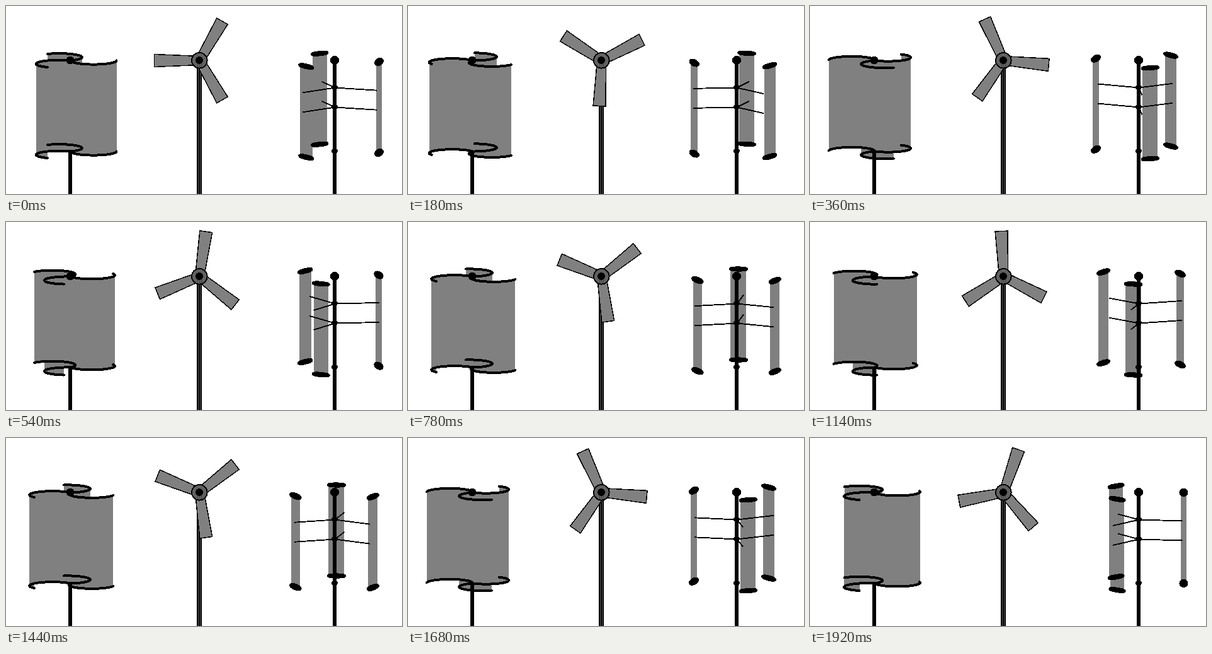
Animation of 629x298 px, one loop 1.98 s. Source, as an HTML page:

```html
<!DOCTYPE html>
<html lang="en">
<head>
<meta charset="utf-8">
<title>Three wind turbines</title>
<style>
  html, body { margin: 0; width: 100%; height: 100%; overflow: hidden; background: #fff; }
  svg { display: block; shape-rendering: crispEdges; }
  .line { fill: none; stroke: #000; stroke-linecap: round; stroke-linejoin: round; }
  .grey { fill: #808080; }
</style>
</head>
<body>
<svg width="629" height="298" viewBox="0 0 629 298">
  <!-- Scooped rotor -->
  <path id="scoopWalls" class="grey"/>
  <path id="scoopRims" class="line" stroke-width="4"/>
  <path d="M102 231V298" stroke="#000" stroke-width="6"/>
  <circle cx="102" cy="86" r="6.5"/>

  <!-- Propeller -->
  <path d="M307 86V298" stroke="#000" stroke-width="8"/>
  <path d="M305.5 86V298M308.5 86V298" stroke="#606060" stroke-width="1"/>
  <path id="propeller" class="grey" stroke="#000" stroke-width="1.5"/>
  <circle cx="307.3" cy="86.3" r="12.3" fill="#606060" stroke="#000" stroke-width="2"/>
  <path d="M304.5 91V97M307.5 91V97M310.5 91V97" stroke="#444" stroke-width="1"/>
  <circle cx="307" cy="86" r="6"/>

  <!-- Upright-blade rotor -->
  <path id="uprightWalls" class="grey"/>
  <path id="uprightCaps" stroke="#000" stroke-width="5.4" stroke-linejoin="round"/>
  <path d="M522 86V298" stroke="#000" stroke-width="6"/>
  <circle cx="522" cy="86" r="7"/>
  <circle cx="522" cy="129" r="4.8"/>
  <circle cx="522" cy="160" r="4.8"/>
  <circle cx="522" cy="230" r="4.8"/>
  <path id="arms" fill="none" stroke="#000" stroke-width="1.9"/>
</svg>
<script>
const STEP_MS = 60, STEPS = 33;
const SCOOP_X = 102.5, PROPELLER_X = 307.5, UPRIGHT_X = 522.5;
const HUB_Y = 86.5, HEIGHT = 144, TILT = 1 / 6;
const { cos, sin, PI, hypot } = Math;
const rad = deg => deg * PI / 180;
const thirds = [0, 120, 240];

const setPath = (id, d) => document.getElementById(id).setAttribute("d", d);
const poly = points => "M" + points.map(p => p.map(n => n.toFixed(2)).join(" ")).join("L");
const lower = points => points.map(([x, y]) => [x, y + HEIGHT]);

// Half circle whose diameter runs from the axis to the outer edge
function scoop(deg) {
  const radius = 36.5, a = rad(deg), points = [];
  for (let i = 0; i <= 32; i++) {
    const b = a + PI + PI * i / 32;
    points.push([
      SCOOP_X + radius * (cos(a) + cos(b)),
      HUB_Y - radius * (sin(a) + sin(b)) * TILT
    ]);
  }
  return points;
}

// Wall below a rim; quads share one winding so that overlaps stay filled
function wall(rim) {
  return rim.slice(1).map((p, i) => {
    const [l, r] = [rim[i], p].sort((u, v) => u[0] - v[0]);
    return poly([l, r, ...lower([r, l])]) + "Z";
  }).join("");
}

function drawScoops(turn) {
  const rims = thirds.map(d => scoop(d + turn));
  setPath("scoopWalls", rims.map(wall).join(""));
  setPath("scoopRims", rims.map(r => poly(r) + poly(lower(r))).join(""));
}

function drawPropeller(turn) {
  const blade = deg => {
    const a = rad(deg);
    const at = (r, side) => [
      PROPELLER_X + r * cos(a) + side * sin(a),
      HUB_Y - r * sin(a) + side * cos(a)
    ];
    return poly([at(8, -7.3), at(72, -10), at(72, 10), at(8, 7.3)]) + "Z";
  };
  setPath("propeller", thirds.map(d => blade(60 + d + turn)).join(""));
}

const bladeCentre = a => [UPRIGHT_X + 71 * cos(a), HUB_Y - 12 * sin(a)];

// Flat ellipse lying along the rotor's circle
function cap(deg) {
  const a = rad(deg), [x, y] = bladeCentre(a), points = [];
  for (let i = 0; i < 24; i++) {
    const b = 2 * PI * i / 24, along = 12.3 * cos(b), across = 4.3 * sin(b);
    points.push([
      x - along * sin(a) + across * cos(a),
      y - (along * cos(a) + across * sin(a)) * 0.32
    ]);
  }
  return points;
}

function uprightWall(deg) {
  const a = rad(deg), [x, y] = bladeCentre(a);
  const half = hypot(12.3 * sin(a), 4.3 * cos(a));
  return poly([[x - half, y], [x + half, y], [x + half, y + HEIGHT], [x - half, y + HEIGHT]]) + "Z";
}

// Each arm leads its blade by its own small angle
const armSet = [
  { angle: -20.5, depth: 12, lift: 0 },
  { angle: 107, depth: 10, lift: 0 },
  { angle: 223.2, depth: 13, lift: 1 }
];

function drawUpright(turn) {
  const angles = thirds.map(d => d - 10 + turn);
  setPath("uprightWalls", angles.map(uprightWall).join(""));
  setPath("uprightCaps", angles.map(cap).map(c => poly(c) + "Z" + poly(lower(c)) + "Z").join(""));
  setPath("arms", [129.5, 160.5].map(y => armSet.map(({ angle, depth, lift }) => {
    const a = rad(angle + turn);
    return poly([[UPRIGHT_X, y], [UPRIGHT_X + 71 * cos(a), y - depth * sin(a) - lift]]);
  }).join("")).join(""));
}

function draw(ms) {
  const turn = -360 / STEPS * (Math.floor(ms / STEP_MS) % STEPS);
  drawScoops(turn);
  drawPropeller(turn);
  drawUpright(turn);
}

const start = performance.now();
function tick() {
  draw(performance.now() - start);
  requestAnimationFrame(tick);
}
tick();
</script>
</body>
</html>
```
